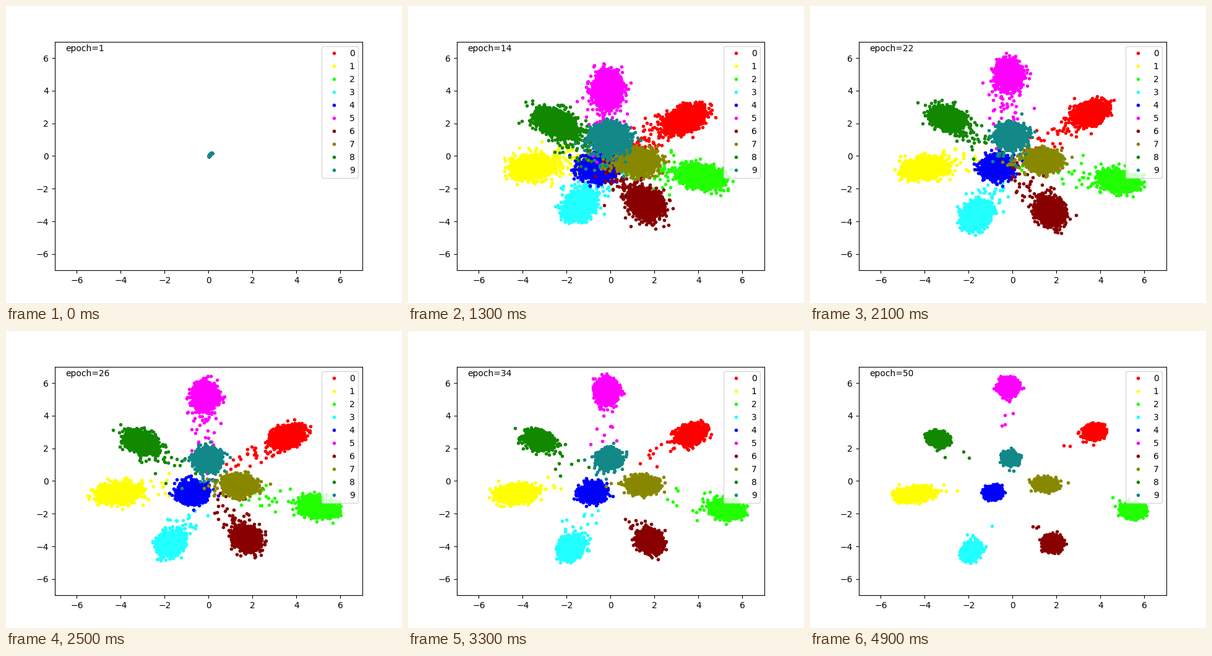
Recreate the animation shown at these times as a matplotlib script. Size 640 by 480 pixels, loop 5 s.

```python
import colorsys

import numpy as np
import matplotlib.pyplot as plt
from matplotlib.animation import FuncAnimation

EPOCHS = 50
SPREAD_EPOCH = 9  # the clusters have unfolded by then and begin to tighten
POINTS = 3000
HUB = np.array((-0.4, -0.2))

# Centre when unfolded, centre at the end, final elongation
CLUSTERS = [
    ((3.2, 1.9), (3.7, 3.0), 1),
    ((-3.2, -0.6), (-4.5, -0.8), 1.8),
    ((3.5, -1.0), (5.5, -1.8), 1),
    ((-1.2, -2.4), (-1.9, -4.3), 1.2),
    ((-0.4, -0.7), (-0.9, -0.7), 1),
    ((-0.1, 3.4), (-0.2, 5.8), 1),
    ((1.5, -2.5), (1.8, -3.8), 1),
    ((1.2, -0.4), (1.5, -0.2), 1.4),
    ((-2.1, 1.8), (-3.4, 2.6), 1),
    ((0.0, 1.1), (-0.1, 1.4), 1),
]


def class_color(label):
    """Six bright hues, then the same hues again at about half brightness."""
    r, g, b = colorsys.hsv_to_rgb(label % 6 / 6, 1, 1 if label < 6 else 0.535)
    return max(r, 0.133 * g), g, b


def lerp(a, b, t):
    return a + (b - a) * t


def cluster(label, epoch):
    """Positions of one class after the given epoch."""
    base = np.random.default_rng(100 + label)
    fresh = np.random.default_rng(1000 * epoch + label)
    first, last, elongation = CLUSTERS[label]

    late = max(epoch - SPREAD_EPOCH, 0)
    span = EPOCHS - SPREAD_EPOCH
    drift = (1 - np.exp(-late / 13)) / (1 - np.exp(-span / 13))
    shrink = (late / span) ** 0.85
    grow = min((epoch - 1) / (SPREAD_EPOCH - 1), 1) ** 0.7

    # Clusters are ellipses that point away from the origin.
    center = lerp(np.array(first), np.array(last), drift) * grow
    radius = np.hypot(*last)
    along = np.array(last) / radius
    across = np.array((-along[1], along[0]))
    length = lerp(1.05 + 0.06 * radius, (0.42 + 0.03 * radius) * elongation, shrink)
    width = lerp(1.1 - 0.04 * radius, 0.42 + 0.015 * radius, shrink)

    noise = 0.88 * base.normal(size=(POINTS, 2)) + 0.475 * fresh.normal(size=(POINTS, 2))
    offset = np.outer(noise[:, 0] * length, along) + np.outer(noise[:, 1] * width, across)
    offset *= grow ** 0.5 / 3
    points = center + offset

    # A thinning tail of misplaced points scatters towards the middle.
    count = int(250 * np.exp(-late / 12)) + 3
    pull = base.random((POINTS, 1))[:count] ** 1.7 * lerp(0.9, 0.4, shrink)
    points[:count] = lerp(center, HUB * grow, pull) + 1.6 * offset[:count]

    # Everything starts on one short curved streak.
    t = base.random(POINTS)
    streak = np.column_stack((0.02 + 0.13 * t ** 2, 0.2 * t - 0.02))
    return points + streak * (1 - grow)


fig, ax = plt.subplots(figsize=(6.4, 4.8), dpi=100)
fig.subplots_adjust(left=0.1233)
ax.set_xlim(-7, 7)
ax.set_ylim(-7, 7)
dots = [ax.plot([], [], ".", color=class_color(label), label=str(label))[0]
        for label in range(len(CLUSTERS))]
ax.legend(loc="upper right")
caption = ax.text(-6.5, 6.4, "")


def draw(frame):
    epoch = frame + 1
    for label, line in enumerate(dots):
        line.set_data(*cluster(label, epoch).T)
    caption.set_text(f"epoch={epoch}")
    return [*dots, caption]


animation = FuncAnimation(fig, draw, frames=EPOCHS, interval=100,
                          repeat=True, repeat_delay=0)
plt.show()
```
